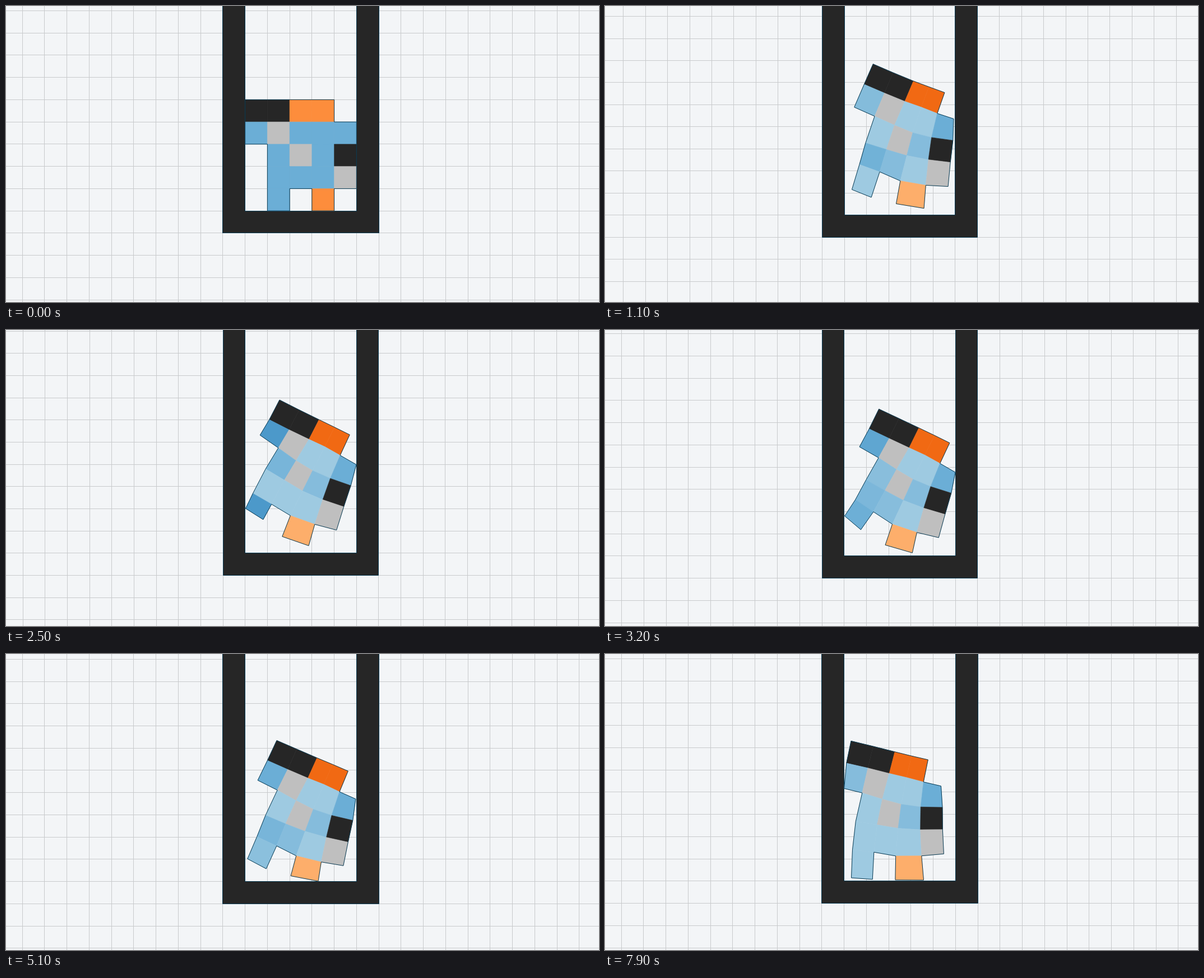
These frames come from a looping animation (1058 px wide and 529 px high, 8 s). An HTML page with a canvas:

```html
<!DOCTYPE html>
<html lang="en">
<head>
<meta charset="utf-8">
<title>Soft robot in a shaft</title>
<style>
html, body { margin: 0; width: 100%; height: 100%; overflow: hidden; background: #f3f5f7; }
canvas { display: block; }
</style>
</head>
<body>
<canvas id="stage" width="1058" height="529"></canvas>
<script>
const ctx = document.getElementById('stage').getContext('2d');
const W = 1058, H = 529, LOOP = 8000, STEP = 100, MID = 526;
const EDGE = '#0b3c54', DARK = '#262626', GRAY = '#bfbfbf', PAPER = '#f3f5f7', GRID = '#c8cacc';

// K rigid, G soft, B stretches upright, O stretches sideways
const BODY = ['KKOO.', 'BGBBB', '.BGBK', '.BBBG', '.B.O.'];
// Contraction of each muscle: 0 long, 4 neutral, 8 short; letters follow the pose
const MUSCLE = ['..88.', 'a.004', '.b.2.', '.cd0.', '.e.0.'];
const OUTLINE = '00 10 20 30 40 41 51 52 53 54 44 45 35 34 24 25 15 14 13 12 02 01'.split(' ');
const PINS = ['00', '51', '15', '45'];
const RAMP = {
  B: [[158, 202, 225], [107, 174, 214], [66, 146, 198]],
  O: [[253, 174, 107], [253, 141, 60], [241, 105, 19]]
};
const CORNERS = [[0, 0], [1, 0], [1, 1], [0, 1]];
const ROUNDS = 300, GIVE = .7;

// Time, muscles a to e, lower edge of the box, then head, arm, left foot, right foot
const poses = [];
const pose = (time, flex, base, ...pins) =>
  poses.push({ time, v: [base, ...pins, ...[...flex].map(Number)] });
pose(0, '44444', 405.9, 426.65, 167.4, 625.35, 207.2, 466.4, 366.1, 585.6, 366.1);
pose(500, '00320', 404.2, 455, 117, 619, 198, 458.5, 352.5, 584, 360);
pose(1700, '50420', 427.2, 490, 98.5, 625, 210, 428, 312.5, 550.5, 365.5);
pose(2500, '73007', 438.4, 488, 125, 625, 240.5, 427.5, 319, 540, 385.5);
pose(4000, '30640', 446.5, 489.5, 152, 625, 262, 428, 350, 558.5, 406);
pose(6200, '50003', 446.2, 470, 155.5, 621, 253, 435, 380, 555.5, 406);
pose(7900, '20000', 445.7, 439, 155.5, 599.5, 236, 439.5, 400, 568.5, 404);

const clamp = (x, lo, hi) => Math.max(lo, Math.min(hi, x));

// Monotone cubic, so that nothing overshoots a wall
function slope(k, c) {
  const rate = n => (poses[n + 1].v[c] - poses[n].v[c]) / (poses[n + 1].time - poses[n].time);
  if (k === 0) return rate(0);
  if (k === poses.length - 1) return rate(k - 1);
  const s = rate(k - 1), t = rate(k);
  return s * t > 0 ? 2 * s * t / (s + t) : 0;
}

function sample(time) {
  let k = 0;
  while (k < poses.length - 2 && time >= poses[k + 1].time) k++;
  const a = poses[k], b = poses[k + 1], span = b.time - a.time;
  const u = (time - a.time) / span, w = 1 - u;
  return a.v.map((p, c) =>
    w * w * (1 + 2 * u) * p + u * u * (3 - 2 * u) * b.v[c] +
    span * u * w * (w * slope(k, c) - u * slope(k + 1, c)));
}

// The view zooms out briefly after the jump
const zoom = t => 39.75 - .46 * Math.min(1, t / 500) * Math.exp(-Math.max(0, t - 500) / 1200);

function makeCells(time, flex) {
  const tension = Math.min(1, time / 500), cells = [];
  BODY.forEach((row, j) => [...row].forEach((kind, i) => {
    if (kind === '.') return;
    const m = MUSCLE[j][i], letter = 'abcde'.indexOf(m);
    const level = m === '.' ? 4 : letter >= 0 ? flex[letter] : 4 + (m - 4) * tension;
    cells.push({ kind, level, keys: CORNERS.map(([x, y]) => `${i + x}${j + y}`) });
  }));
  return cells;
}

// Pulls a cell towards its own rectangle, turned to the best angle
function pull({ kind, level, keys }, pts, size, sums) {
  const p = keys.map(k => pts[k]);
  const cx = p.reduce((s, q) => s + q[0], 0) / 4, cy = p.reduce((s, q) => s + q[1], 0) / 4;
  const long = size * (1 + (4 - level) / 16);
  let w = kind === 'O' ? long : size, h = kind === 'B' ? long : size;
  let dot = 0, cross = 0;
  CORNERS.forEach(([x, y], n) => {
    const rx = (x - .5) * w, ry = (y - .5) * h, dx = p[n][0] - cx, dy = p[n][1] - cy;
    dot += rx * dx + ry * dy;
    cross += rx * dy - ry * dx;
  });
  const len = Math.hypot(dot, cross) || 1, c = dot / len, s = cross / len;
  let wide = 0, tall = 0;
  CORNERS.forEach(([x, y], n) => {
    const dx = p[n][0] - cx, dy = p[n][1] - cy;
    wide += (x - .5) * (c * dx + s * dy);
    tall += (y - .5) * (c * dy - s * dx);
  });
  if (kind === 'B' || kind === 'G') w += GIVE * (wide - w);
  if (kind === 'O' || kind === 'G') h += GIVE * (tall - h);
  const weight = kind === 'K' ? 4 : 1;
  CORNERS.forEach(([x, y], n) => {
    const rx = (x - .5) * w, ry = (y - .5) * h, sum = sums[keys[n]];
    sum[0] += weight * (cx + c * rx - s * ry);
    sum[1] += weight * (cy + s * rx + c * ry);
    sum[2] += weight;
  });
}

// Relaxes the lattice between the pinned corners
function relax(cells, pins, size, floor) {
  const pts = {}, [x0, y0] = pins, dx = pins[6] - x0, dy = pins[7] - y0;
  const a = (4 * dx + 5 * dy) / 41, b = (4 * dy - 5 * dx) / 41;
  cells.forEach(({ keys }) => keys.forEach(k => {
    const [i, j] = [...k].map(Number);
    pts[k] = [x0 + a * i - b * j, y0 + b * i + a * j];
  }));
  const pin = () => PINS.forEach((k, n) => { pts[k] = pins.slice(2 * n, 2 * n + 2); });
  const left = MID - 2.5 * size, right = MID + 2.5 * size;
  pin();
  for (let r = 0; r < ROUNDS; r++) {
    const sums = {};
    for (const k in pts) sums[k] = [0, 0, 0];
    cells.forEach(cell => pull(cell, pts, size, sums));
    for (const k in pts) {
      const [x, y, n] = sums[k];
      pts[k] = [clamp(x / n, left, right), Math.min(y / n, floor)];
    }
    pin();
  }
  return pts;
}

function tint(kind, level) {
  if (kind === 'K') return DARK;
  if (kind === 'G') return GRAY;
  const pos = clamp(level / 4, 0, 2), k = Math.min(1, Math.floor(pos));
  const [a, b] = [RAMP[kind][k], RAMP[kind][k + 1]];
  return `rgb(${a.map((x, i) => Math.round(x + (b[i] - x) * (pos - k)))})`;
}

function drawScene(size, base) {
  const px = n => Math.floor(MID + n * size);
  const py = n => Math.floor(base - n * size);
  ctx.fillStyle = PAPER;
  ctx.fillRect(0, 0, W, H);
  ctx.fillStyle = GRID;
  for (let n = -13.5; n < 14; n++) ctx.fillRect(px(n), 0, 1, H);
  for (let n = -4; n < 13; n++) ctx.fillRect(0, py(n), W, 1);

  const [x0, x1, x2, x3] = [-3.5, -2.5, 2.5, 3.5].map(px), y0 = py(0), y1 = py(1);
  ctx.fillStyle = DARK;
  ctx.fillRect(x0, 0, x1 - x0, y0);
  ctx.fillRect(x2, 0, x3 - x2, y0);
  ctx.fillRect(x0, y1, x3 - x0, y0 - y1);
  ctx.strokeStyle = EDGE;
  ctx.lineWidth = 1;
  ctx.strokeRect(x0 + .5, -5.5, x3 - x0, y0 + 6);
  ctx.strokeRect(x1 + .5, -5.5, x2 - x1, y1 + 6);
}

function trace(points) {
  ctx.beginPath();
  points.forEach(([x, y]) => ctx.lineTo(x, y));
  ctx.closePath();
}

function drawBody(cells, pts) {
  ctx.lineJoin = 'round';
  ctx.lineWidth = .6;
  cells.forEach(({ kind, level, keys }) => {
    trace(keys.map(k => pts[k]));
    ctx.fillStyle = ctx.strokeStyle = tint(kind, level);
    ctx.fill();
    ctx.stroke();
  });
  trace(OUTLINE.map(k => pts[k]));
  ctx.strokeStyle = EDGE;
  ctx.lineWidth = 1;
  ctx.stroke();
}

function draw(time) {
  const [base, ...rest] = sample(time), size = zoom(time);
  const pins = rest.slice(0, 8), cells = makeCells(time, rest.slice(8));
  drawScene(size, base);
  drawBody(cells, relax(cells, pins, size, base - size));
}

const start = performance.now();
let shown = -1;
function tick() {
  const time = Math.floor((performance.now() - start) % LOOP / STEP) * STEP;
  if (time !== shown) draw(shown = time);
  requestAnimationFrame(tick);
}
tick();
</script>
</body>
</html>
```
